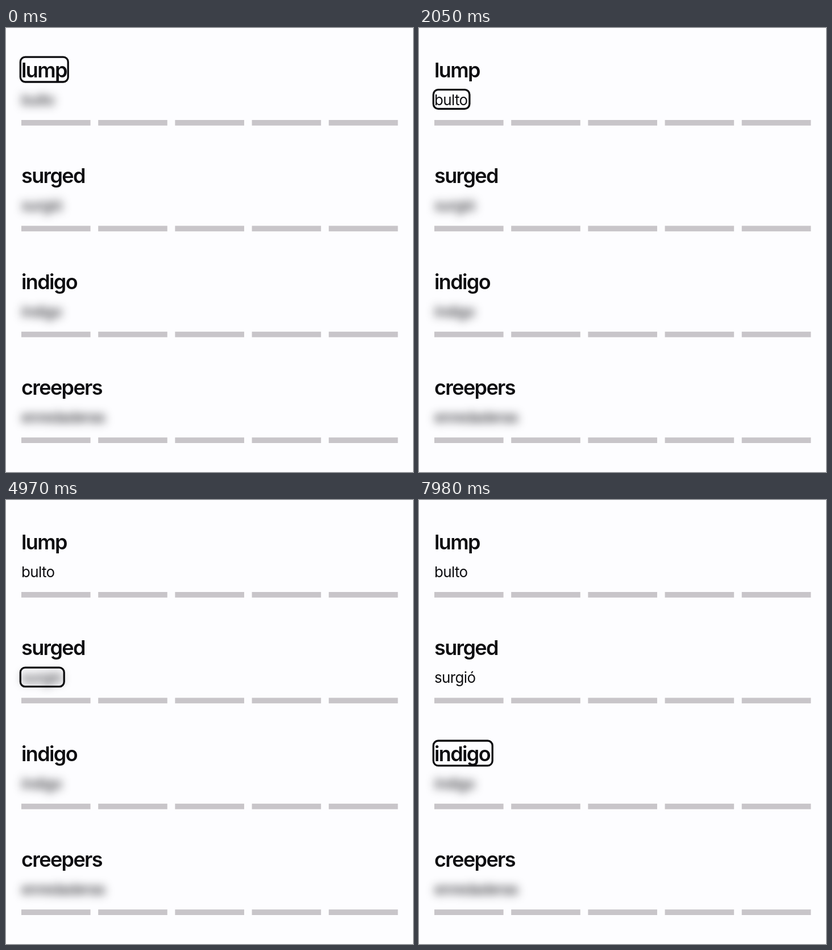
These frames come from a looping animation (716x782 px, 8000 ms). An HTML page:

```html
<!DOCTYPE html>
<html lang="en">
<head>
<meta charset="utf-8">
<title>Word list</title>
<style>
  html, body { margin: 0; width: 100%; height: 100%; overflow: hidden; background: #fdfdff; }
  svg { display: block; width: 716px; height: 782px; }
  text { font-family: Inter, "Liberation Sans", sans-serif; font-optical-sizing: none; fill: #0e0e11; }
  .word { font-size: 36px; font-weight: 600; letter-spacing: -0.045em; }
  .meaning { font-size: 26px; font-weight: 400; letter-spacing: -0.025em; }
  .bar { fill: #c8c5c9; }
  #ring { fill: none; stroke: #0b0b0e; stroke-width: 3.3; }
</style>
</head>
<body>
<svg id="stage" viewBox="0 0 716 782" xmlns="http://www.w3.org/2000/svg"></svg>
<script>
const LOOP = 8000;
const LEFT = 27;
const ROW_PITCH = 186.4;
const BLUR = 8;
const REVEAL_MS = 320;

// wordWidth and meaningWidth size the focus ring; revealAt is when the meaning unblurs.
const rows = [
  { word: "lump", meaning: "bulto", wordWidth: 80.3, meaningWidth: 60, revealAt: 1690 },
  { word: "surged", meaning: "surgió", wordWidth: 113.5, meaningWidth: 73.3, revealAt: 6870 },
  { word: "indigo", meaning: "índigo", wordWidth: 100.3, meaningWidth: 72, revealAt: Infinity },
  { word: "creepers", meaning: "enredaderas", wordWidth: 144, meaningWidth: 148, revealAt: Infinity }
];

const focusSteps = [
  { at: 0, row: 0, part: "word" },
  { at: 480, row: 0, part: "meaning" },
  { at: 2820, row: 1, part: "word" },
  { at: 2890, row: 1, part: "meaning" },
  { at: 4150, row: 1, part: "word" },
  { at: 4970, row: 1, part: "meaning" },
  { at: 7600, row: 2, part: "word" }
];

const ringShape = {
  word: { top: 51.2, height: 43.8 },
  meaning: { top: 108.7, height: 33.6 }
};

const stage = document.getElementById("stage");

function add(tag, attrs, content = "") {
  const node = document.createElementNS("http://www.w3.org/2000/svg", tag);
  setAttrs(node, attrs);
  node.textContent = content;
  return stage.appendChild(node);
}

function setAttrs(node, attrs) {
  for (const [name, value] of Object.entries(attrs)) node.setAttribute(name, value);
}

rows.forEach((row, i) => {
  const top = i * ROW_PITCH;
  add("text", { class: "word", x: LEFT, y: top + 87 }, row.word);
  row.node = add("text", { class: "meaning", x: LEFT, y: top + 136 }, row.meaning);
  for (let k = 0; k < 5; k++) {
    add("rect", { class: "bar", x: LEFT + k * 135.2, y: top + 162, width: 121.6, height: 9.8 });
  }
});
const ring = add("rect", { id: "ring", x: 25.3, rx: 8.5 });

const clamp = v => Math.min(1, Math.max(0, v));
const smooth = p => p * p * (3 - 2 * p);

function render(time) {
  for (const row of rows) {
    const radius = BLUR * (1 - smooth(clamp((time - row.revealAt) / REVEAL_MS)));
    row.node.style.filter = radius > 0.05 ? `blur(${radius.toFixed(2)}px)` : "none";
  }
  const focus = focusSteps.filter(step => step.at <= time).pop();
  const shape = ringShape[focus.part];
  setAttrs(ring, {
    y: shape.top + focus.row * ROW_PITCH,
    width: rows[focus.row][focus.part + "Width"] + 3.6,
    height: shape.height
  });
}

const start = performance.now();
function tick() {
  render((performance.now() - start) % LOOP);
  requestAnimationFrame(tick);
}
tick();
</script>
</body>
</html>
```
